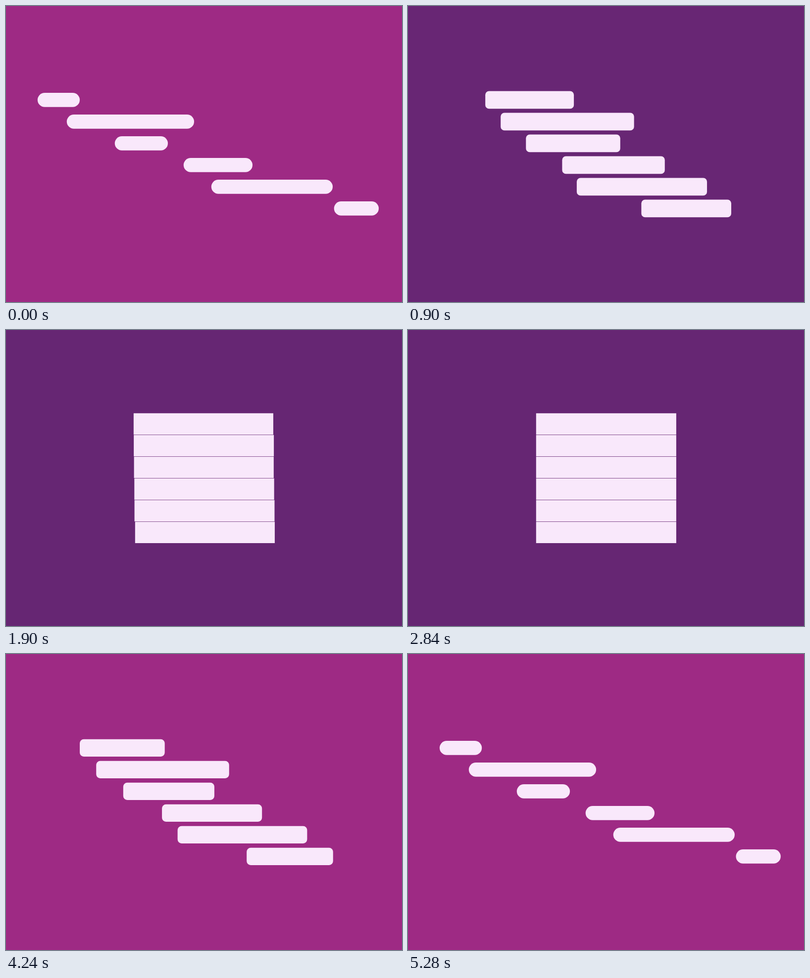
These frames come from a looping animation (800 px wide and 600 px high, 5.64 s). An HTML page:

```html
<!DOCTYPE html>
<html lang="en">
<head>
<meta charset="utf-8">
<title>Bars to table</title>
<style>
  html, body { margin: 0; width: 100%; height: 100%; overflow: hidden; background: #9e2a84; }
  svg { display: block; width: 800px; height: 600px; }
</style>
</head>
<body>
<svg viewBox="0 0 800 600">
  <rect id="back" width="800" height="600"/>
  <g id="bars" fill="#f9e8fb"></g>
</svg>
<script>
const LOOP = 5640, STEP = 20;
const GATHER = 455, SCATTER = 3727, MOVE = 1600, FADE = 510;

// Left and right ends of each bar when scattered; all share one span as a table.
const SPREAD = [[63.8, 149], [122.8, 380], [219.8, 327], [358.8, 498], [414.8, 660], [662.7, 753]];
const TABLE = [258.8, 541.9];
const FIRST_ROW = 190.4, ROW_GAP = 44;
const PILL_HEIGHT = 28.8, CELL_HEIGHT = 43.2;
const PINK = [158, 42, 132], PURPLE = [102, 38, 115];

const back = document.getElementById("back");
const bars = SPREAD.map(() => {
  const rect = document.createElementNS("http://www.w3.org/2000/svg", "rect");
  return document.getElementById("bars").appendChild(rect);
});

const mix = (a, b, k) => a + (b - a) * k;
const clamp = v => Math.min(1, Math.max(0, v));
const smooth = s => s * s * (3 - 2 * s);

// cubic-bezier(.26, 0, .18, 1), solved by bisection
function ease(x) {
  if (x <= 0 || x >= 1) return clamp(x);
  let low = 0, high = 1, s = 0.5;
  for (let i = 0; i < 30; i++) {
    s = (low + high) / 2;
    const r = 1 - s;
    const at = 3 * 0.26 * s * r * r + 3 * 0.18 * s * s * r + s * s * s;
    if (at < x) low = s; else high = s;
  }
  return smooth(s);
}

// 0 = scattered, 1 = table
const phase = (t, length, curve) =>
  curve(clamp((t - GATHER) / length)) - curve(clamp((t - SCATTER) / length));

function draw(t) {
  const p = phase(t, MOVE, ease);
  const tint = phase(t, FADE, smooth);
  const color = PINK.map((c, i) => Math.round(mix(c, PURPLE[i], tint)));
  back.setAttribute("fill", `rgb(${color})`);

  const height = mix(PILL_HEIGHT, CELL_HEIGHT, p);
  bars.forEach((bar, i) => {
    const [left, right] = SPREAD[i].map((x, side) => mix(x, TABLE[side], p));
    const shape = {
      x: left,
      y: FIRST_ROW + i * ROW_GAP - height / 2,
      width: right - left,
      height,
      rx: mix(PILL_HEIGHT / 2, 0, p)
    };
    for (const key in shape) bar.setAttribute(key, shape[key].toFixed(3));
  });
}

const start = performance.now();
function tick() {
  const t = (performance.now() - start) % LOOP;
  draw(Math.floor(t / STEP) * STEP);
  requestAnimationFrame(tick);
}
tick();
</script>
</body>
</html>
```
